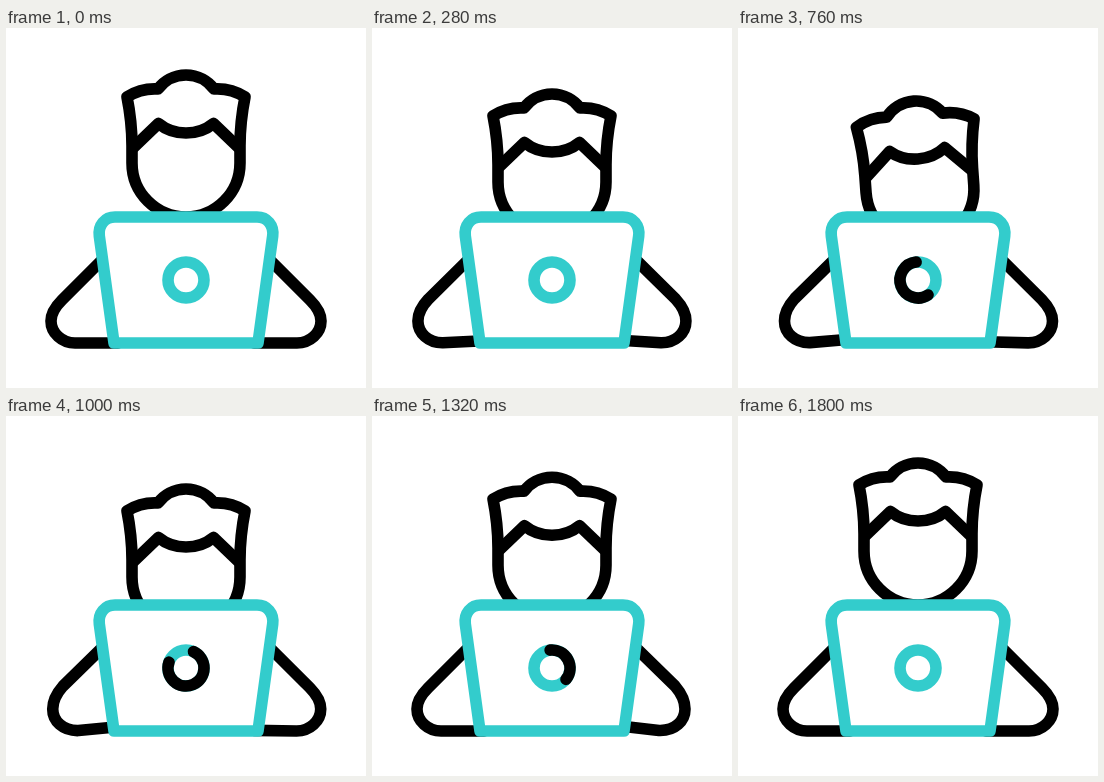
An HTML page for the animation above (2000 ms loop, 360 by 360 pixels).

```html
<!DOCTYPE html>
<html lang="en">
<head>
<meta charset="utf-8">
<title>Working at a laptop</title>
<style>
  html, body { margin: 0; width: 100%; height: 100%; overflow: hidden; background: #fff; }
  svg { display: block; width: 100%; height: 100%; }
</style>
</head>
<body>
<svg viewBox="0 0 360 360" fill="none" stroke="#000" stroke-width="11.6" stroke-linecap="round" stroke-linejoin="round">
  <g id="head">
    <path d="M121 69 Q135 60 152 61 A35 35 0 0 1 208 61 Q225 60 239 69 Q234 94 234 118 V135 A54 54 0 0 1 126 135 V118 Q126 94 121 69 Z"/>
    <path d="M128 119 L152.500 95.500 Q164 105 180 105 T207.500 95.500 L232 119"/>
  </g>
  <path id="left"/>
  <path id="right" transform="matrix(-1 0 0 1 360 0)"/>
  <g stroke="#33cccc">
    <path fill="#fff" d="M108 315 L93.300 208 C92 197 99 189 109 189 H251 C261 189 268 197 266.700 208 L252 315 Z"/>
    <circle cx="180" cy="252" r="18"/>
  </g>
  <path id="arc"/>
</svg>
<script>
const LOOP = 2000, STEP = 40, MOVE_START = 40, MOVE_END = 1800;
const [head, left, right, arc] = ['head', 'left', 'right', 'arc'].map(id => document.getElementById(id));

const ramp = (t, from, to) => Math.min(1, Math.max(0, (t - from) / (to - from)));
const easeOut = x => 1 - (1 - x) ** 3;
const easeInOut = x => (1 - Math.cos(Math.PI * x)) / 2;

// The elbow tucks in and the hand lifts while the shoulder stays put
function armPath(tap) {
  const elbow = 45 + 2 * tap;
  return `M100 228 L${56 + tap} ${272 - 2 * tap}
    C${elbow + 4} ${279 - 2 * tap} ${elbow} 285 ${elbow} 293
    C${elbow} 305 ${56 + tap} 315 ${69 + 4 * tap} ${315 - tap / 2}
    L112 ${315 - 5 * tap}`;
}

// Angles run counterclockwise from the top of the ring
function ringPoint(degrees) {
  const a = degrees * Math.PI / 180;
  return `${180 - 18 * Math.sin(a)} ${252 - 18 * Math.cos(a)}`;
}

function arcPath(from, to) {
  if (to - from < 0.1) return '';
  const middle = (from + to) / 2;
  return `M${ringPoint(from)} A18 18 0 0 0 ${ringPoint(middle)} A18 18 0 0 0 ${ringPoint(to)}`;
}

function render(t) {
  const drop = 26 * (easeOut(ramp(t, MOVE_START, 720)) - easeInOut(ramp(t, 1000, 1680)));
  const tilt = -4.1 * Math.sin(Math.PI * ramp(t, 500, 1000)) ** 2;
  head.setAttribute('transform', `translate(0 ${drop}) rotate(${tilt} 180 108)`);

  // The hands type in turn, fading in and out at the ends of the loop
  const strength = ramp(t, MOVE_START, 160) * ramp(t, MOVE_END, 1640);
  const turn = Math.sin(Math.PI * (t - 480) / 840) ** 2;
  left.setAttribute('d', armPath(strength * turn));
  right.setAttribute('d', armPath(strength * (1 - turn)));

  arc.setAttribute('d', arcPath(6 + 360 * ramp(t, 870, 1590), 6 + 360 * ramp(t, 350, 1060)));
}

const start = performance.now();
function tick() {
  const t = (performance.now() - start) % LOOP;
  render(Math.floor(t / STEP) * STEP);
  requestAnimationFrame(tick);
}
tick();
</script>
</body>
</html>
```
